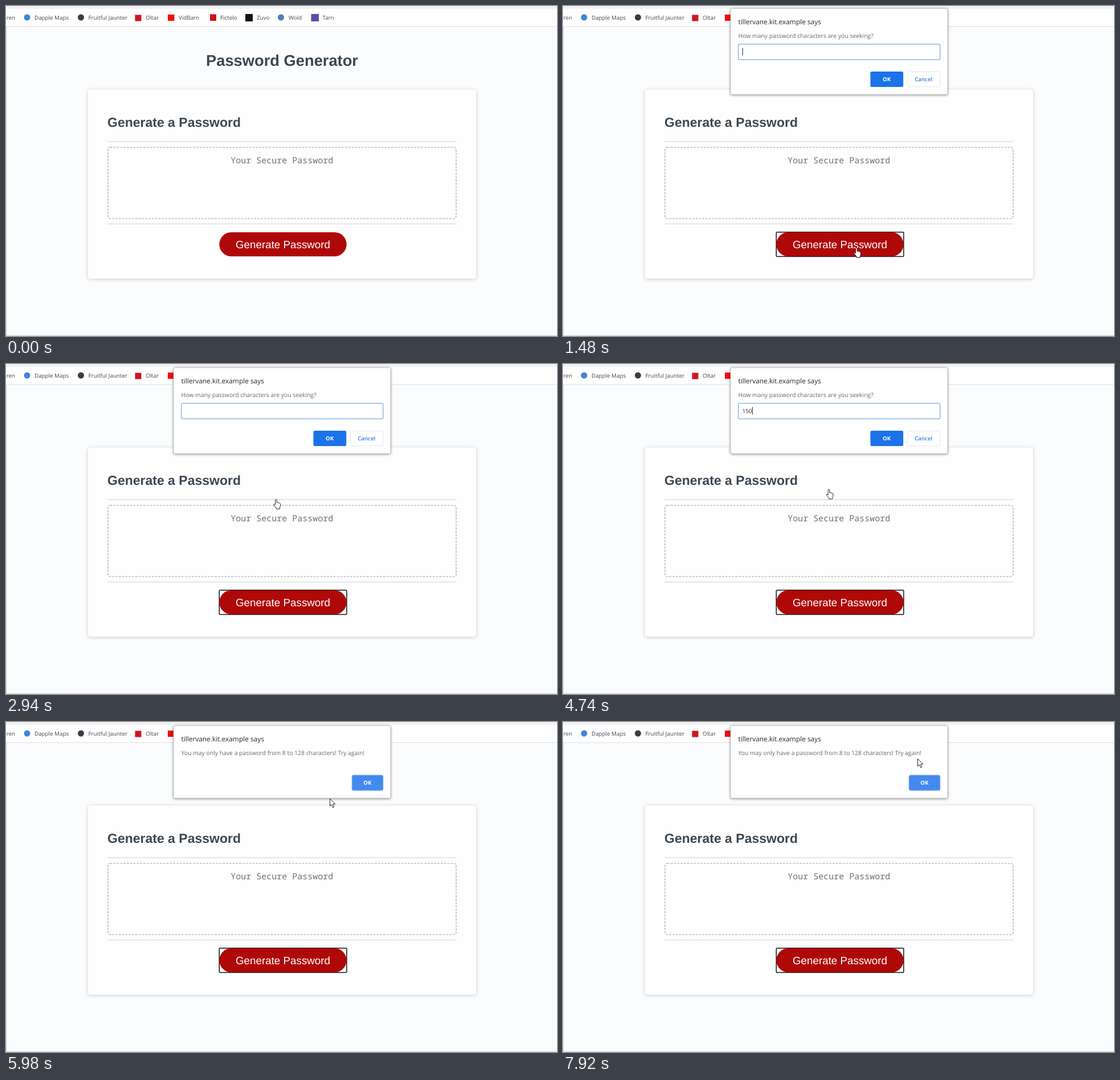
An HTML page that plays this animation: 967x579 px, repeating every 8000 ms.

```html
<!DOCTYPE html>
<html lang="en">
<head>
<meta charset="utf-8">
<title>Password Generator</title>
<style>
  html, body { margin: 0; width: 100%; height: 100%; overflow: hidden; background: #fafcfe; }
  svg { display: block; text-rendering: geometricPrecision; }
  .ui { font-family: "Open Sans", "Noto Sans", sans-serif; }
  .page { font-family: "Liberation Sans", Arial, sans-serif; }
  .head { font-weight: 700; fill: #3b4751; }
  .mid { text-anchor: middle; }
  .marks { font-size: 9.8px; fill: #45494d; }
  .hint { font: 15px "Noto Sans Mono", monospace; fill: #717171; }
  .card { fill: #fefefe; filter: drop-shadow(0 1px 3px rgba(0, 0, 0, .2)); }
  .sheet { fill: #fff; stroke: #b4b4b4; stroke-width: .8; filter: drop-shadow(0 1.5px 2px rgba(0, 0, 0, .4)); }
  .title { font-size: 11.9px; fill: #26282b; }
  .msg { font-size: 10.4px; fill: #63676b; }
  .btn { font-size: 9.7px; font-weight: 700; fill: #fff; text-anchor: middle; }
  .pointer { fill: #fff; stroke: #1c1c22; stroke-width: .95; stroke-linejoin: round; }
</style>
</head>
<body>
<svg width="967" height="579" viewBox="0 0 967 579">
  <defs>
    <radialGradient id="glow">
      <stop offset="0" stop-color="#f4e800" stop-opacity=".62"/>
      <stop offset=".72" stop-color="#f0e614" stop-opacity=".54"/>
      <stop offset="1" stop-color="#e6e650" stop-opacity="0"/>
    </radialGradient>
  </defs>

  <rect width="967" height="579" fill="#fafcfe"/>
  <rect width="967" height="36" fill="#fff"/>
  <rect width="967" height="5" fill="#f1f2f3"/>
  <rect y="35.5" width="967" height="1" fill="#dcdee0"/>
  <rect y="36" width="1" height="543" fill="#c9cbcd"/>
  <rect y="578" width="967" height="1" fill="#c9cbcd"/>

  <g>
    <circle cx="37" cy="20" r="5.5" fill="#3f86d8"/>
    <circle cx="131.5" cy="20" r="5.5" fill="#3a3d40"/>
    <rect x="226.5" y="15.5" width="11" height="11" fill="#d0141f"/>
    <rect x="284" y="15" width="11.5" height="11" fill="#f50c0c"/>
    <rect x="358" y="14.5" width="11" height="11.5" fill="#cf1018"/>
    <rect x="420" y="14" width="13" height="13" fill="#101512"/>
    <circle cx="482.5" cy="20" r="5.5" fill="#4a7fb8"/>
    <rect x="535.5" y="14" width="13.5" height="13" fill="#5a4fa8"/>
  </g>
  <g class="ui marks">
    <text x="16" y="24" text-anchor="end">ren</text>
    <text x="50" y="24">Dapple Maps</text>
    <text x="144.5" y="24">Fruitful Jaunter</text>
    <text x="245" y="24">Oltar</text>
    <text x="303" y="24">VidBarn</text>
    <text x="376" y="24">Fictelo</text>
    <text x="440" y="24">Zuvo</text>
    <text x="496" y="24">Wold</text>
    <text x="555.5" y="24">Tarn</text>
  </g>

  <g class="page">
    <text class="head mid" x="484.5" y="104.7" font-size="27.3">Password Generator</text>
    <rect class="card" x="144" y="146.5" width="681" height="332" rx="4.5"/>
    <text class="head" x="178" y="212" font-size="23">Generate a Password</text>
    <rect x="178" y="237" width="612.5" height="1.7" fill="#e0e3e6"/>
    <rect x="178" y="381.5" width="612.5" height="1.7" fill="#e0e3e6"/>
    <rect x="179" y="248" width="611" height="125" rx="4" fill="none" stroke="#bbbfc3" stroke-width="1.7" stroke-dasharray="3.8 2"/>
    <text class="hint mid" x="484.3" y="276">Your Secure Password</text>
    <rect id="ring" x="374.3" y="396.8" width="223.6" height="42.6" rx="1.5" fill="#fff" stroke="#111" stroke-width="1.5"/>
    <rect x="374.3" y="397" width="223.4" height="42.3" rx="21.15" fill="#af0808"/>
    <text class="mid" x="486" y="425" font-size="18.8" fill="#fff">Generate Password</text>
  </g>

  <g id="prompt" class="ui">
    <rect class="sheet" x="294" y="6.3" width="381" height="151" rx="2.5"/>
    <text class="title" x="307.5" y="33.8">tillervane.kit.example says</text>
    <text class="msg" x="307.5" y="58">How many password characters are you seeking?</text>
    <rect x="307.7" y="69" width="354" height="27.2" rx="2" fill="#fff" stroke="#93b8ec" stroke-width="1.5"/>
    <text id="typed" x="314.7" y="86" font-size="10" fill="#333"></text>
    <rect id="caret" y="75.5" width="1" height="13" fill="#222"/>
    <rect id="ok" x="539.5" y="117" width="57.7" height="27" rx="2.8"/>
    <text class="btn" x="568" y="133.7">OK</text>
    <rect x="604.3" y="117.4" width="57.4" height="26.3" rx="2.8" fill="#fff" stroke="#dfe1e5" stroke-width=".9"/>
    <text class="btn" x="632.7" y="133.7" style="fill:#2f7de0;font-weight:600">Cancel</text>
  </g>

  <g id="alert" class="ui">
    <rect class="sheet" x="294" y="6.3" width="381" height="127.5" rx="2.5"/>
    <text class="title" x="307.5" y="33.8">tillervane.kit.example says</text>
    <text class="msg" x="307.5" y="58">You may only have a password from 8 to 128 characters! Try again!</text>
    <rect x="607" y="93" width="55" height="27.3" rx="2.8" fill="#4389ee" stroke="#a9c8f6" stroke-width="1"/>
    <text class="btn" x="634.3" y="109.8">OK</text>
  </g>

  <g id="cursor">
    <path id="arrow" class="pointer" d="M.5.5V13.6L3.5 10.8 5.6 16 7.8 15 5.6 10H9.8Z"/>
    <path id="hand" class="pointer" transform="translate(-5 -.6)" d="M5 1C5.9 1 6.3 1.6 6.3 2.4V7Q7.6 6.1 8.4 7.2 9.7 6.6 10.4 7.8 12.1 7.4 12.5 9V12.2Q12.5 14.2 11.3 15.6V18H5.3V16.5Q3.2 13.6 1.1 11.1.2 9.7 1.3 9.4 2.4 9.1 3.7 10.7V2.4C3.7 1.6 4.1 1 5 1Z"/>
    <circle id="click" r="12" fill="url(#glow)"/>
  </g>
</svg>
<script>
  const LOOP = 8000, STEP = 77;
  const el = id => document.getElementById(id);
  const [ring, prompt, alert_, typed, caret, ok, cursor, arrow, hand, click] =
    ["ring", "prompt", "alert", "typed", "caret", "ok", "cursor", "arrow", "hand", "click"].map(el);

  // Mouse strokes: start time, number of steps, points
  const strokes = [
    [250, 11, [[838, 563], [515, 424]]],
    [1720, 10, [[515, 424], [474, 237]]],
    [4350, 2, [[474, 237], [472, 219]]],
    [4670, 2, [[472, 219], [461, 220]]],
    [5060, 8, [[461, 220], [568, 134]]],
    [6210, 11, [[568, 134], [566, 139], [500, 92], [461, 66], [467, 63]]],
    [7150, 11, [[467, 63], [622, 64]]]
  ];

  const smooth = u => u * u * (3 - 2 * u);
  const within = (t, ...spans) => spans.some(([a, b]) => t >= a && t < b);
  const show = (node, on) => node.setAttribute("visibility", on ? "inherit" : "hidden");
  // Last entry whose start time has passed
  const latest = (list, t) => list.filter(e => e[0] <= t).pop();

  function along(pts, p) {
    const lens = pts.slice(1).map((b, i) => Math.hypot(b[0] - pts[i][0], b[1] - pts[i][1]));
    let d = p * lens.reduce((a, b) => a + b), i = 0;
    while (i < lens.length - 1 && d > lens[i]) d -= lens[i++];
    const f = d / lens[i], a = pts[i], b = pts[i + 1];
    return [a[0] + (b[0] - a[0]) * f, a[1] + (b[1] - a[1]) * f];
  }

  // Stages: start time, opacity, vertical shift
  function pose(node, stages, t) {
    const [, alpha, dy] = latest(stages, t) || [0, 0, 0];
    node.setAttribute("visibility", alpha ? "visible" : "hidden");
    node.setAttribute("opacity", alpha);
    node.setAttribute("transform", `translate(0 ${dy})`);
  }

  function drawCursor(t) {
    const stroke = latest(strokes, t);
    cursor.setAttribute("visibility", stroke ? "visible" : "hidden");
    if (!stroke) return;
    const [start, n, pts] = stroke;
    const k = Math.floor((t - start) / STEP + .02) + 1;
    const [x, y] = along(pts, smooth(Math.min(1, k / n)));
    const isHand = t < 1100 ? x < 598 && y < 440 : y > 158;
    cursor.setAttribute("transform", `translate(${x} ${y})`);
    show(hand, isHand);
    show(arrow, !isHand);
    show(click, within(t, [1100, 1400], [5670, 5900]));
    click.setAttribute("opacity", within(t, [1100, 1180], [1330, 1400], [5830, 5900]) ? .5 : 1);
  }

  function render(t) {
    show(ring, t >= 1100);
    pose(prompt, [[1330, .4, -3], [1400, .8, -2.5], [1480, 1, -2], [1560, 1, 0], [5830, .4, 0], [5900, 0, 0]], t);
    pose(alert_, [[5900, .75, -2.5], [5980, 1, 0]], t);
    const digits = [3340, 3420, 3570].filter(s => t >= s).length;
    typed.textContent = "150".slice(0, digits);
    caret.setAttribute("x", 314.8 + digits * 5.72);
    show(caret, within(t, [1330, 1950], [2410, 2940], [3340, 4120], [4670, 5210], [5740, 5900]));
    ok.setAttribute("fill", t >= 5440 ? "#2a7ae8" : "#1a73e8");
    drawCursor(t);
  }

  const began = performance.now();
  function tick() {
    render((performance.now() - began) % LOOP);
    requestAnimationFrame(tick);
  }
  tick();
</script>
</body>
</html>
```
